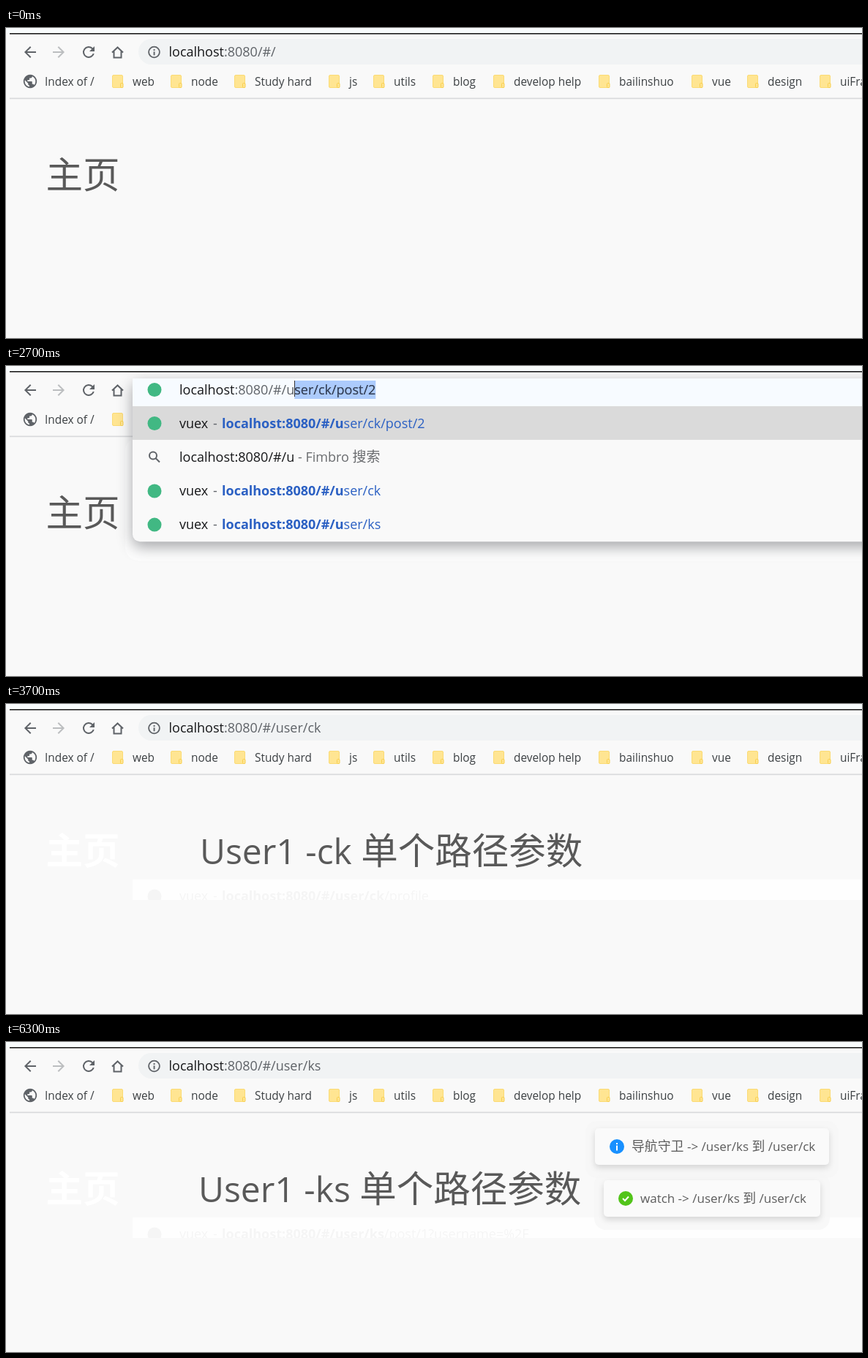
Write an HTML page with a canvas that moves like this. It is 1170 by 424 pixels and loops after 8000 ms.

```html
<!DOCTYPE html>
<html lang="zh">
<head>
<meta charset="utf-8">
<title>Router params</title>
<style>
  html, body { margin: 0; width: 100%; height: 100%; overflow: hidden; background: #f9f9f9; }
  canvas { display: block; }
</style>
</head>
<body>
<canvas id="stage" width="1170" height="424"></canvas>
<script>
const ctx = document.getElementById('stage').getContext('2d');
const LOOP = 8000;
const HOST = 'localhost', ROOT = ':8080/#/';
const GREY = '#5f6368', DARK = '#161719', BLUE = '#2b60c3', PAGE = '#f9f9f9';
const TITLE_SIZE = 48, TITLE_Y = 219;

const BOOKMARKS = [[145, 'web'], [225, 'node'], [312, 'Study hard'], [441, 'js'], [502, 'utils'],
  [583, 'blog'], [666, 'develop help'], [810, 'bailinshuo'], [937, 'vue'], [1013, 'design'], [1112, 'uiFrame']];

const CK_ROWS = ['user/ck', 'user/ck/post/2', 'user/ck/post/2?username=%2F', 'user/ck/profile'];
const KS_ROWS = ['user/ks', 'user/ks/profile', 'user/ks/porst', 'user/ks/post/1?username=%2F'];

// Each entry overrides the state from its start time on; select holds the [start, end) of the marked text.
const TIMELINE = [
  [0, { path: '', page: 'home', focus: false, select: null, caret: false, rows: null }],
  [1000, { focus: true, select: [0, 99] }],
  [1300, { select: [14, 99] }],
  [1800, { select: null, caret: true }],
  [2300, { caret: false }],
  [2700, { path: 'u', rows: ['user/ck/post/2', 'user/ck', 'user/ks'] }],
  [2900, { path: 'use', rows: ['user/', 'user/ck', 'user/ks'] }],
  [3100, { path: 'user/', rows: ['user/', 'user/ck', 'user/ks', 'user/ck/post/2', 'user/1'] }],
  [3300, { path: 'user/c', rows: CK_ROWS }],
  [3400, { path: 'user/ck' }],
  [3600, { page: 'ck' }],
  [3700, { focus: false, rows: null }],
  [4700, { focus: true, select: [0, 99] }],
  [4800, { select: [22, 99] }],
  [5900, { path: 'user/ks', select: null, rows: KS_ROWS }],
  [6100, { page: 'ks', focus: false, rows: null }],
];

const ICONS = {
  back: new Path2D('M20 11H7.83l5.59-5.59L12 4l-8 8 8 8 1.41-1.41L7.83 13H20z'),
  reload: new Path2D('M17.65 6.35A8 8 0 1 0 19.73 14h-2.08A6 6 0 1 1 16.22 7.78L13 11h7V4z'),
  home: new Path2D('M4.5 12.6L12 5.5l7.5 7.1M7 11v8.5h10V11'),
  globe: new Path2D('M12 2a10 10 0 1 0 .01 0zm-1 17.93c-3.95-.49-7-3.85-7-7.93 0-.62.08-1.21.21-1.79L9 15v1c0 1.1.9 2 2 2zm6.9-2.54c-.26-.81-1-1.39-1.9-1.39h-1v-3c0-.55-.45-1-1-1H8v-2h2c.55 0 1-.45 1-1V7h2c1.1 0 2-.9 2-2v-.41A8 8 0 0 1 17.9 17.39z'),
  search: new Path2D('M15 10a5 5 0 1 1-10 0a5 5 0 0 1 10 0M13.7 13.7L19 19'),
  tick: new Path2D('M8 12l3 3 5-5.5'),
};

function icon(name, cx, cy, color, { scale = 1, flip = 1, line = 0 } = {}) {
  ctx.save();
  ctx.translate(cx, cy);
  ctx.scale(scale * flip, scale);
  ctx.translate(-12, -12);
  ctx.fillStyle = ctx.strokeStyle = color;
  ctx.lineWidth = line;
  line ? ctx.stroke(ICONS[name]) : ctx.fill(ICONS[name], 'evenodd');
  ctx.restore();
}

function rect(x, y, w, h, color) {
  ctx.fillStyle = color;
  ctx.fillRect(x, y, w, h);
}

function rounded(x, y, w, h, r, color, stroke, line = 1) {
  ctx.beginPath();
  ctx.roundRect(x, y, w, h, r);
  ctx.fillStyle = color;
  ctx.fill();
  if (!stroke) return;
  ctx.strokeStyle = stroke;
  ctx.lineWidth = line;
  ctx.stroke();
}

function disc(x, y, r, color) {
  ctx.beginPath();
  ctx.arc(x, y, r, 0, 7);
  ctx.fillStyle = color;
  ctx.fill();
}

function shadowed(color, blur, dy, draw) {
  ctx.save();
  ctx.shadowColor = color;
  ctx.shadowBlur = blur;
  ctx.shadowOffsetY = dy;
  draw();
  ctx.restore();
}

// Draws mixed Latin and Chinese text and returns the x where it ends.
function text(str, x, y, color, size = 18, weight = 400) {
  ctx.fillStyle = color;
  for (const run of str.match(/[\u4e00-\u9fff]+|[^\u4e00-\u9fff]+/g) || []) {
    ctx.font = run >= '\u4e00'
      ? `${weight} ${size / 0.95}px "Noto Sans CJK SC", "Noto Sans CJK", sans-serif`
      : `${weight} ${size}px "Open Sans", "Noto Sans", sans-serif`;
    ctx.fillText(run, x, y);
    x += ctx.measureText(run).width;
  }
  return x;
}

function widthOf(str) {
  ctx.font = '400 18px "Open Sans", "Noto Sans", sans-serif';
  return ctx.measureText(str).width;
}

function drawUrl(x, path, select, caret) {
  const full = HOST + ROOT + path;
  const edge = index => x + widthOf(full.slice(0, index));
  if (select) rect(edge(select[0]), 20, edge(select[1]) - edge(select[0]), 25, '#accbfc');
  text(ROOT + path, text(HOST, x, 39, DARK), 39, GREY);
  if (select && select[0] > 0) text(full.slice(select[0]), edge(select[0]), 39, '#33415c');
  if (caret) rect(Math.round(edge(select ? select[0] : full.length)), 20, 1, 22, '#333');
}

function drawToolbar({ focus, rows }) {
  rect(0, 0, 1170, 7, '#f8fbfc');
  rect(5, 7, 1165, 1.5, '#111');
  icon('back', 33, 33, GREY);
  icon('back', 72, 33, '#bcbec0', { flip: -1 });
  icon('reload', 113, 33, GREY);
  icon('home', 152.5, 33, GREY, { line: 2 });

  if (focus && !rows) rounded(180.2, 15, 1020, 35.6, 17.8, '#f7fbfe', '#b5d5fa', 2);
  else if (!rows) rounded(181, 15, 1020, 35, 17.5, '#f1f3f4');
  ctx.beginPath();
  ctx.arc(202.5, 33, 7.4, 0, 7);
  ctx.strokeStyle = GREY;
  ctx.lineWidth = 1.8;
  ctx.stroke();
  rect(201.6, 29, 1.9, 2, GREY);
  rect(201.6, 32.3, 1.9, 5, GREY);

  icon('globe', 33, 73, GREY, { scale: 0.92 });
  text('Index of /', 53, 79, '#3c4043', 15.4);
  for (const [x, label] of BOOKMARKS) {
    rounded(x + .5, 64.5, 14, 17, 1.5, '#ffe592', '#fbdb74');
    rounded(x + 11.5, 75.5, 3.5, 6, 1, '#ffe592', '#f8cf4e');
    text(label, x + 28, 79, '#3c4043', 15.4);
  }
  rect(5, 95.5, 1165, 1.7, '#d9dadc');
}

function drawSuggestion(path, typed, y, ghost) {
  disc(203, y - 6, 9.5, ghost || '#41b883');
  text('vuex', 237, y, ghost || DARK);
  text('-', 283, y, ghost || GREY);
  const split = path.startsWith(typed) ? typed.length : 0;
  const x = text(HOST + ROOT + path.slice(0, split), 295, y, ghost || BLUE, 18, 700);
  text(path.slice(split), x, y, ghost || BLUE);
}

const drawBand = () => rect(173, 240, 997, 28, '#fefefe');

function drawPopup({ path, rows }, t) {
  const pitch = 46.3, bottom = 55 + (rows.length + 1) * pitch;
  rounded(163, 98, 1040, bottom - 72, 18, '#fdfdfd');
  shadowed('rgba(40,44,50,.42)', 20, 7, () => rounded(173, 17, 1040, bottom - 17, [8, 8, 10, 10], PAGE));
  rect(173, 17, 997, 38, '#f7fbff');
  rect(173, 55, 997, 46, '#dadada');
  if (t >= 3100) drawBand();
  if (t >= 5900) text('User1 -ck 单个路径参数', 265, TITLE_Y, '#fefefe', TITLE_SIZE);

  disc(203, 32.5, 9.5, '#41b883');
  const full = HOST + ROOT + path;
  const completed = rows[0].length > path.length;
  drawUrl(237, completed ? rows[0] : path, completed ? [full.length, 99] : null, true);

  drawSuggestion(rows[0], path, 84.5);
  icon('search', 203, 124.5, GREY, { line: 2 });
  text(' - Fimbro 搜索', text(full, 237, 131, DARK), 131, '#6a6c6f');
  rows.slice(1).forEach((row, i) => drawSuggestion(row, path, 177 + i * 46.1));
}

function drawPage({ page, path, rows }) {
  if (page === 'home') {
    text('主页', 54.5, TITLE_Y, '#595959', TITLE_SIZE);
    return;
  }
  text('主页', 54.5, TITLE_Y, '#fff', TITLE_SIZE, 700);
  if (rows) return;
  drawBand();
  drawSuggestion(page === 'ck' ? CK_ROWS[3] : KS_ROWS[3], path, 269, '#f5f5f5');
  rect(173, 268, 997, 12, PAGE);
  text(`User1 -${page} 单个路径参数`, page === 'ck' ? 265 : 263, TITLE_Y, '#595959', TITLE_SIZE);
}

function drawNotice(x, y, w, color, label) {
  rounded(x - 13, y - 10, w + 26, 78, 16, 'rgba(247,247,247,.8)');
  shadowed('rgba(0,0,0,.14)', 9, 4, () => rounded(x, y, w, 50, 5, '#fafafa'));
  disc(x + 30, y + 25, 10, color);
  if (label.startsWith('watch')) {
    icon('tick', x + 30, y + 25, '#fff', { line: 2 });
  } else {
    rect(x + 29, y + 20, 2, 2, '#fff');
    rect(x + 29, y + 23.5, 2, 7, '#fff');
  }
  text(label, x + 50, y + 31, '#5c5c5c', 17);
}

function drawNotices(t) {
  const p = Math.min(1, (Math.floor(t / 100) * 100 - 6000) / 300);
  ctx.save();
  ctx.beginPath();
  ctx.rect(0, 98, 1170, 326);
  ctx.clip();
  ctx.globalAlpha = p;
  ctx.translate(0, -50 * (1 - p) ** 2);
  drawNotice(805, 118, 320, '#1890ff', '导航守卫 -> /user/ks 到 /user/ck');
  drawNotice(817, 189, 296, '#52c41a', 'watch -> /user/ks 到 /user/ck');
  ctx.restore();
}

function draw(t) {
  const state = {};
  for (const [start, change] of TIMELINE) if (t >= start) Object.assign(state, change);
  rect(0, 0, 1170, 424, PAGE);
  drawPage(state);
  drawToolbar(state);
  if (state.rows) drawPopup(state, t);
  else drawUrl(222.5, state.path, state.select, state.caret);
  if (t >= 6100) drawNotices(t);
}

const began = performance.now();
function frame() {
  draw((performance.now() - began) % LOOP);
  requestAnimationFrame(frame);
}
frame();
</script>
</body>
</html>
```
